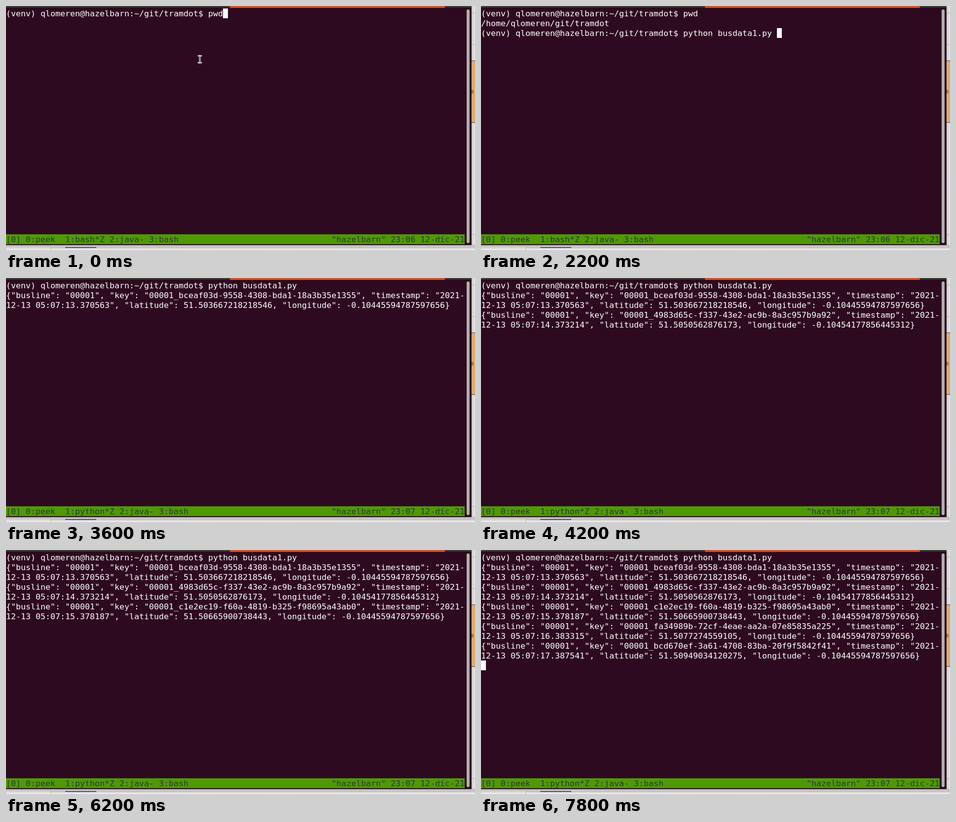
Recreate the animation shown at these times as an HTML page. Size 951 px wide and 497 px high, loop 8000 ms.

```html
<!DOCTYPE html>
<html lang="en">
<head>
<meta charset="utf-8">
<title>Terminal session</title>
<style>
  html, body { margin: 0; width: 100%; height: 100%; overflow: hidden; background: #f2f2f2; }
  svg { display: block; }
  text { font: 16.61px "DejaVu Sans Mono", monospace; fill: #fff; white-space: pre; }
  #left, #right { fill: #2e3436; }
</style>
</head>
<body>
<svg width="951" height="497" viewBox="0 0 951 497">
  <defs>
    <linearGradient id="below" x2="0" y2="1">
      <stop stop-color="#b4b4b4"/><stop offset="1" stop-color="#f2f2f2"/>
    </linearGradient>
    <linearGradient id="beside">
      <stop stop-color="#c6c6c6"/><stop offset="1" stop-color="#eaeaea"/>
    </linearGradient>
  </defs>

  <!-- page behind the window -->
  <rect y="487" width="951" height="10" fill="url(#below)"/>
  <rect x="944" width="7" height="487" fill="url(#beside)"/>
  <path d="M91.5 487V497M92 492.5H951M944 14.5H951M944 78.5H951M944 465.5H951" stroke="#b2b2b2"/>
  <rect x="120" y="491" width="63" height="2" fill="#4548a8"/>
  <rect x="944" y="111" width="7" height="127" fill="#dcab72"/>
  <path d="M944 111.5H951M944 237.5H951" stroke="#222" stroke-dasharray="3 1"/>
  <text x="943" y="178" style="font-size:9px;fill:#333">8</text>

  <!-- terminal window -->
  <rect width="944" height="487" fill="#2e0a20"/>
  <rect width="944" height="3" fill="#3c3b37"/>
  <path d="M454 0H890V3L889 4H455L454 3Z" fill="#c9532c"/>
  <rect x="934" y="7" width="6" height="476" rx="3" fill="#b3aeb0"/>
  <rect y="465" width="930" height="20" fill="#4e9a06"/>
  <text id="left" y="481"></text>
  <text id="right" x="660" y="481"></text>
  <g id="rows"></g>
  <rect id="cursor" width="10" height="20" fill="#fff"/>
  <g id="pointer" fill="none">
    <path d="M389 101.5H397M389 115.5H397M393 101V116" stroke="#fff" stroke-width="3"/>
    <path d="M390 101.5H392M394 101.5H396M390 115.5H392M394 115.5H396M393 102V115" stroke="#111"/>
  </g>
</svg>
<script>
const $ = id => document.getElementById(id);
const LOOP = 8000, COLS = 93;
const host = "hazelbarn", user = "qlomeren", project = "tramdot";
const prompt = `(venv) ${user}@${host}:~/git/${project}$ `;
const run = prompt + "python busdata1.py ";

const records = [
  ["bceaf03d-9558-4308-bda1-18a3b35e1355", "13.370563", "51.503667218218546", "-0.10445594787597656"],
  ["4983d65c-f337-43e2-ac9b-8a3c957b9a92", "14.373214", "51.5050562876173", "-0.10454177856445312"],
  ["c1e2ec19-f60a-4819-b325-f98695a43ab0", "15.378187", "51.50665900738443", "-0.10445594787597656"],
  ["fa34989b-72cf-4eae-aa2a-07e85835a225", "16.383315", "51.5077274559105", "-0.10445594787597656"],
  ["bcd670ef-3a61-4708-83ba-20f9f5842f41", "17.387541", "51.50949034120275", "-0.10445594787597656"]
].flatMap(([key, sec, lat, lon]) => {
  const s = `{"busline": "00001", "key": "00001_${key}", "timestamp": "2021-12-13 05:07:${sec}", ` +
            `"latitude": ${lat}, "longitude": ${lon}}`;
  return [s.slice(0, COLS), s.slice(COLS)];
});

const typed = cmd => [prompt + "pwd", `/home/${user}/git/${project}`, prompt + cmd];
const output = n => [run, ...records.slice(0, 2 * n), ""];

// [start time, screen lines, cursor shown after the last line]
const steps = [
  [0, [prompt + "pwd"], true],
  [200, typed(""), true],
  [700, typed(""), false],
  [900, typed(""), true],
  [1200, typed("pwd"), true],
  [1400, typed("python busdata1.py "), true],
  [2000, typed("python busdata1.py "), false],
  [2200, typed("python busdata1.py "), true],
  [2700, [run], true],
  [3100, output(0), true],
  [3500, output(1), false],
  [4200, output(2), false],
  [4500, output(2), true],
  [4800, output(2), false],
  [5200, output(3), false],
  [5400, output(3), true],
  [6200, output(3), false],
  [6500, output(4), false],
  [6600, output(4), true],
  [7200, output(5), true],
  [7500, output(5), false],
  [7800, output(5), true]
];

const rows = Array.from({ length: 12 }, (_, i) => {
  const row = document.createElementNS("http://www.w3.org/2000/svg", "text");
  row.setAttribute("y", 21 + 20 * i);
  return $("rows").appendChild(row);
});
const show = (el, on) => el.setAttribute("visibility", on ? "visible" : "hidden");

let current;
function draw(t) {
  const step = steps.findLast(s => s[0] <= t);
  if (step === current) return;
  current = step;
  const [, lines, blink] = step;
  rows.forEach((row, i) => row.textContent = lines[i] || "");
  const last = lines.length - 1;
  $("cursor").setAttribute("x", 10 * lines[last].length);
  $("cursor").setAttribute("y", 5 + 20 * last);
  show($("cursor"), blink);
  show($("pointer"), t < 200);
  $("left").textContent = `[0] 0:peek  1:${t < 3500 ? "bash" : "python"}*Z 2:java- 3:bash`;
  $("right").textContent = `"${host}" 23:0${t < 2700 ? 6 : 7} 12-dic-21`;
}

const start = performance.now();
function tick() {
  draw((performance.now() - start) % LOOP);
  requestAnimationFrame(tick);
}
tick();
</script>
</body>
</html>
```
